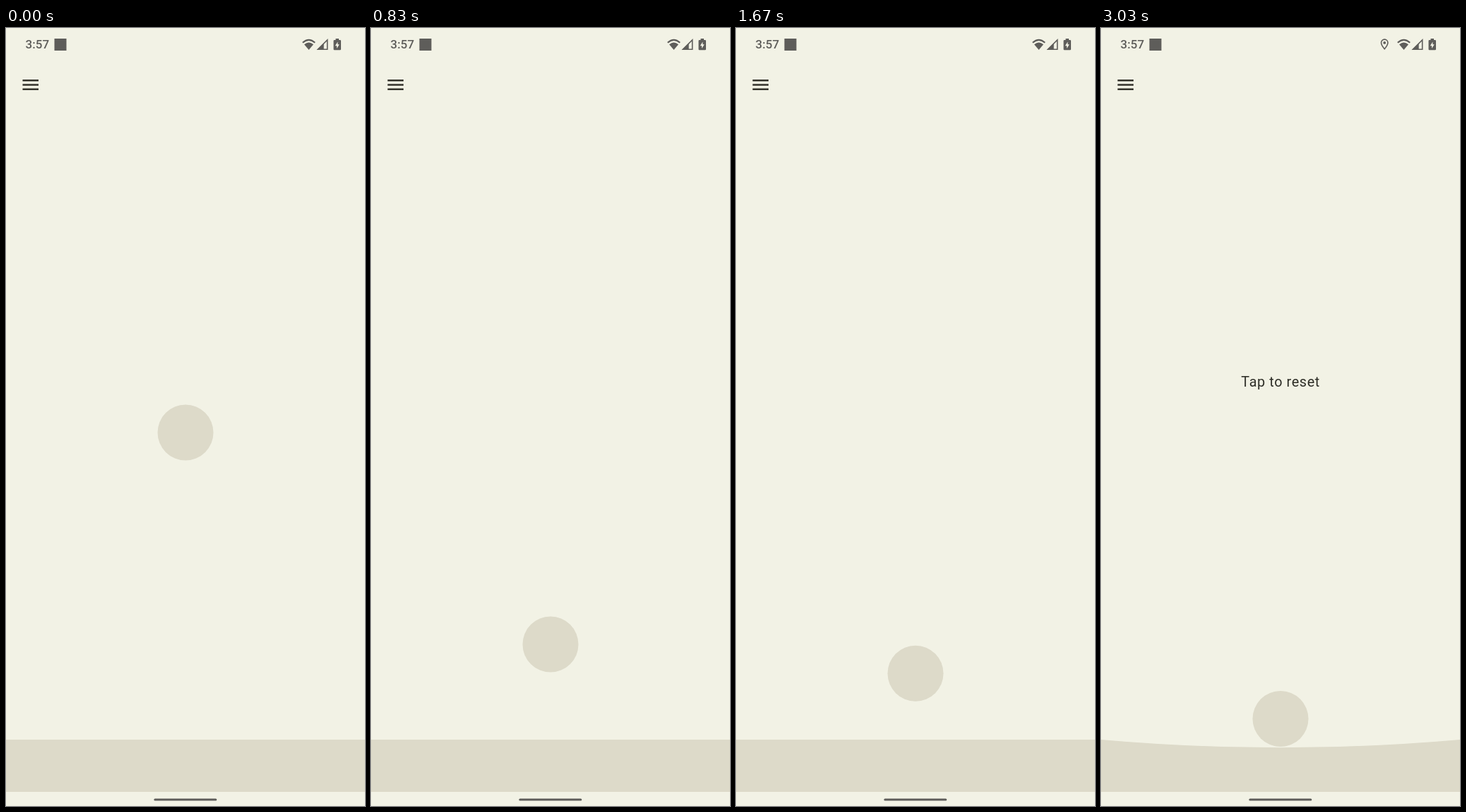
Write an HTML page that moves like this. It is 508 px wide and 1102 px high and loops after 5260 ms.

```html
<!DOCTYPE html>
<html lang="en">
<head>
<meta charset="utf-8">
<title>Trampoline</title>
<style>
  html, body { margin: 0; width: 100%; height: 100%; overflow: hidden; background: #f2f2e5; }
  svg { display: block; width: 508px; height: 1102px; font-family: Roboto, sans-serif; }
</style>
</head>
<body>
<svg viewBox="0 0 508 1102">
  <g fill="#dddac9" style="fill:#dddac9">
    <path id="mat"/>
    <circle id="ball" cx="254" cy="573" r="39.5"/>
  </g>

  <g fill="#5e5d5a">
    <text x="27.6" y="29" font-size="17" font-weight="500">3:57</text>
    <rect x="68.5" y="15" width="17" height="17"/>
    <path d="M422 23.2Q428.5 17.8 435 23.2L428.5 31Z"/>
    <path d="M419.8 20.8Q428.5 12.8 437.2 20.8" fill="none" stroke="#5e5d5a" stroke-width="2.2"/>
    <path d="M441.4 30.2H454.7V17Z" fill="none" stroke="#5e5d5a" stroke-width="1.6"/>
    <path d="M440 31H449.7V21.5Z"/>
    <path d="M466.5 15H471V17H472.7Q474 17 474 18.3V30Q474 31.3 472.7 31.3H464.8Q463.5 31.3 463.5 30V18.3Q463.5 17 464.8 17H466.5Z"/>
    <path d="M469.4 19.5L465.8 25.2H468.1V29L471.7 23.3H469.4Z" fill="#f2f2e5"/>
    <rect x="209.3" y="1091.6" width="89" height="3" rx="1.5"/>
  </g>

  <path d="M23.5 74.25H46M23.5 80.5H46M23.5 86.75H46" stroke="#33322b" stroke-width="2.4"/>

  <g id="done">
    <path d="M401.2 29.8Q396.5 24.2 396.5 20.8A4.7 4.7 0 0 1 405.9 20.8Q405.9 24.2 401.2 29.8Z"
          fill="none" stroke="#5e5d5a" stroke-width="1.6"/>
    <circle cx="401.2" cy="20.9" r="1.9" fill="#5e5d5a"/>
    <text x="198.3" y="508" font-size="19.8" letter-spacing=".617" fill="#2e2e27">Tap to reset</text>
  </g>
</svg>
<script>
  const LOOP = 5260, FPS = 0.03;          // steps per millisecond
  const FLOOR = 968.5, GRAVITY = 1.0242;  // ball centre at contact, half acceleration per step
  const END = 91;

  // Each flight: apex time and height, then the landing: length, ball dip, mat sag
  const flights = [
    { apex: 0,     y: 573,   hold: 0.61, dip: 20,  sag: 20 },
    { apex: 32.45, y: 816.2, hold: 1.14, dip: 16,  sag: 16 },
    { apex: 54.16, y: 896.5, hold: 1.55, dip: 8.9, sag: 9.2 },
    { apex: 69.5,  y: 938.5, hold: 2.07, dip: 7,   sag: 5.8 },
    { apex: 80.5,  y: 956,   hold: 0,    dip: 10,  sag: 11.3 }
  ];

  function pose(n) {
    for (const f of flights) {
      const land = f.apex + Math.sqrt((FLOOR - f.y) / GRAVITY);
      if (n < land) return { y: f.y + GRAVITY * (n - f.apex) ** 2, sag: 0 };
      let press;
      if (!f.hold) press = 1 - (1 - (n - land) / (END - land)) ** 5;
      else if (n < land + f.hold) press = Math.sqrt(Math.sin(Math.PI * (n - land) / f.hold));
      else continue;
      return { y: FLOOR + f.dip * press, sag: f.sag * press };
    }
  }

  const el = id => document.getElementById(id);
  const mat = el("mat"), ball = el("ball"), done = el("done");

  function draw(now) {
    const n = Math.min(END, Math.floor((now % LOOP + 3.4) * FPS));
    const { y, sag } = pose(n);
    ball.setAttribute("cy", y);
    mat.setAttribute("d", `M0 1008Q254 ${1008 + 2 * sag} 508 1008V1082H0Z`);
    done.setAttribute("visibility", n === END ? "visible" : "hidden");
  }

  let start;
  function tick(now) {
    start ??= now;
    draw(now - start);
    requestAnimationFrame(tick);
  }
  draw(0);
  requestAnimationFrame(tick);
</script>
</body>
</html>
```
